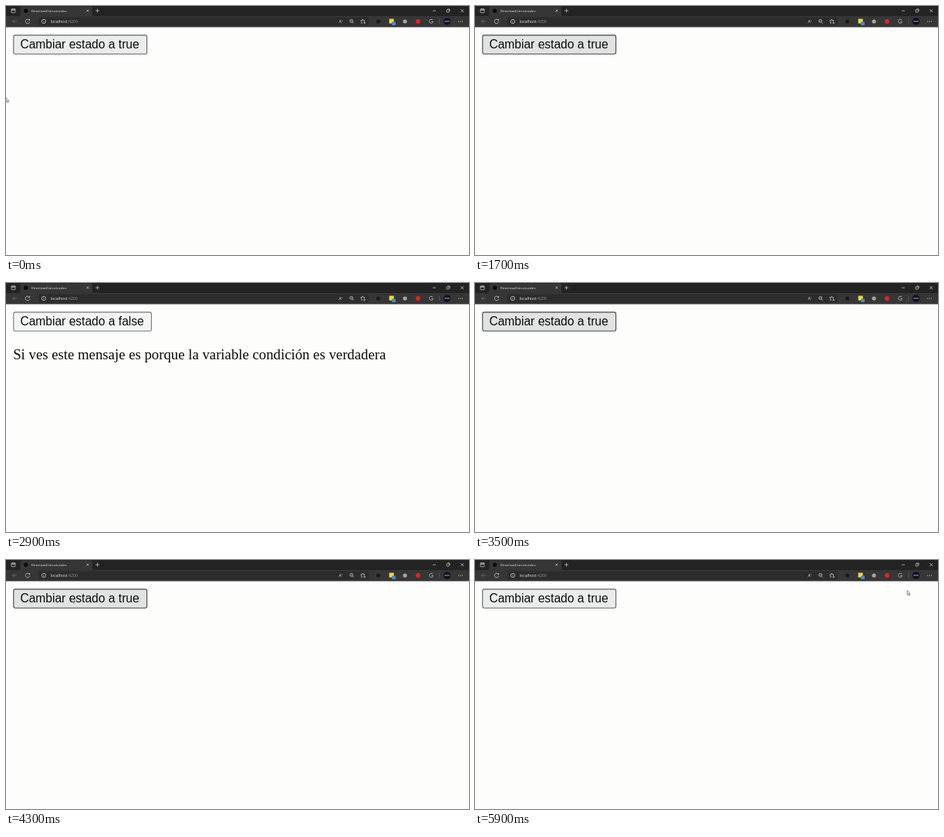
An HTML page for the animation above (6.1 s loop, 600 px wide and 323 px high).

```html
<!DOCTYPE html>
<html lang="es">
<head>
<meta charset="utf-8">
<title>DirectivasEstructurales</title>
<style>
  html, body { margin: 0; width: 100%; height: 100%; overflow: hidden; background: #fdfdfc; }
  svg { display: block; width: 100vw; height: 100vh; }

  .ui { font-family: "Open Sans", sans-serif; fill: #e6e6e6; }
  .line { fill: none; stroke: #d2d2d2; stroke-width: .7; }
  .dim { stroke: #777; }
  .label { font: 15.6px "Liberation Sans", Arial, sans-serif; fill: #0b0b0b; }
  .message { font: 18.75px "Liberation Serif", Times, serif; fill: #0b0b0b; }

  .box, .on, .off, .pointer { animation: 6100ms step-end infinite; }
  .box { animation-name: press; }
  .on { animation-name: show; }
  .off { animation-name: hide; }
  .pointer { animation-name: move; }

  @keyframes press {
    0%, 85.24%, 100% { fill: #ebeded; stroke: #626464; }
    4.91%, 9.83%, 21.31%, 36.06%, 49.18%, 60.65%, 68.85%, 75.4%, 80.32% { fill: #e0e3e2; stroke: #454747; }
    8.19%, 19.67%, 34.42%, 47.54%, 59.01%, 67.21%, 73.77%, 78.68% { fill: #f4f6f6; stroke: #777979; }
  }
  @keyframes show {
    0%, 21.31%, 49.18%, 68.85%, 80.32%, 100% { visibility: hidden; }
    9.83%, 36.06%, 60.65%, 75.4% { visibility: visible; }
  }
  @keyframes hide {
    0%, 21.31%, 49.18%, 68.85%, 80.32%, 100% { visibility: visible; }
    9.83%, 36.06%, 60.65%, 75.4% { visibility: hidden; }
  }
  @keyframes move {
    0%, 100% { transform: translate(-.5px, 118.4px); }
    1.63% { transform: translate(30px, 92px); }
    3.27% { transform: translate(70px, 59px); }
    4.91% { transform: translate(85px, 49px); }
    83.6% { transform: translate(307.6px, 39.6px); }
    85.24% { transform: translate(412px, 41px); }
    86.88% { transform: translate(482px, 42px); }
    88.52% { transform: translate(526px, 42px); }
    90.16% { transform: translate(549px, 41px); }
    91.8% { transform: translate(558px, 40px); }
    93.44% { transform: translate(559.7px, 39.2px); }
  }
</style>
</head>
<body>
<svg viewBox="0 0 600 323" preserveAspectRatio="none">
  <rect width="600" height="323" fill="#fdfdfc"/>

  <!-- Tab strip and toolbar -->
  <rect width="600" height="14" fill="#232323"/>
  <path d="M0 27.4V13H16.5Q18.5 13 18.5 11V2.5Q18.5.5 20.5.5H110Q112 .5 112 2.5V11Q112 13 114 13H600V27.4Z" fill="#363636"/>
  <rect x="42" y="14.6" width="428" height="11" rx="2" fill="#2c2c2c"/>

  <g class="line">
    <rect x="7" y="3.7" width="5" height="5" rx=".8"/>
    <path d="M7 5H12" stroke-width="1.2"/>
    <path d="M104.3 4.6l3 3m0-3l-3 3"/>
    <path d="M116 6.1h5m-2.5-2.5v5"/>
    <path d="M553 6.2h4M589.2 4.2l4 4m0-4l-4 4"/>
    <rect x="571" y="4.8" width="3.2" height="3.2" rx=".5"/>
    <path d="M572.2 4H575V6.9"/>
    <path class="dim" d="M14 20H8.4m2.5-2.5L8.4 20l2.5 2.5"/>
    <path d="M30.3 18.3A2.8 2.8 0 1 0 30.8 20.5M30.7 16.9V18.7H28.9"/>
    <circle cx="49" cy="20" r="2.7"/>
    <path d="M49 19.7v1.7M49 18.2v.7"/>
    <circle cx="447.6" cy="19.4" r="2"/>
    <path d="M449.1 20.9l1.6 1.6M446.7 19.4h1.8"/>
    <path d="M462.3 17l.8 1.8 2 .2-1.5 1.4M462.3 17l-.8 1.8-2 .2 1.5 1.4-.4 2 1.3-.7M463.4 22h2.6m-1.3-1.3v2.6"/>
    <path d="M553 18.2A2.5 2.5 0 1 0 553.6 20.3H551.5"/>
    <path class="dim" d="M561.7 16.5v7" stroke-width=".5"/>
  </g>

  <g class="ui">
    <circle cx="25.7" cy="6.2" r="2.7" fill="#0c0c0c"/>
    <text x="32.8" y="7.8" font-size="4.3">DirectivasEstructurales</text>
    <text x="57.8" y="21.8" font-size="5.2">localhost<tspan fill="#909090">:4200</tspan></text>
    <text x="431.4" y="21.8" font-size="5">A<tspan dy="-1.6" font-size="3.2">»</tspan></text>
    <circle cx="482.5" cy="20" r="2.5" fill="#191919"/>
    <rect x="496.6" y="16.6" width="6" height="6" fill="#e9d84b"/>
    <rect x="500" y="20.6" width="5" height="4.4" rx=".8" fill="#4d83cf"/>
    <circle cx="517" cy="20" r="2.6" fill="#a5a5a5"/>
    <circle cx="534" cy="20" r="3" fill="#d9262e"/>
    <circle cx="571.5" cy="20" r="4.6" fill="#100e18"/>
    <rect x="568" y="18.8" width="7" height="2.2" rx="1" fill="#6a4a91"/>
    <circle cx="586.6" cy="20" r=".6"/>
    <circle cx="589" cy="20" r=".6"/>
    <circle cx="591.4" cy="20" r=".6"/>
  </g>

  <!-- Page -->
  <g class="off">
    <rect class="box" x="9.8" y="37.9" width="172.8" height="24.4" rx="2.2" stroke-width="1.1"/>
    <text class="label" x="18.4" y="55.3">Cambiar estado a true</text>
  </g>
  <g class="on">
    <rect class="box" x="9.8" y="37.9" width="178.6" height="24.4" rx="2.2" stroke-width="1.1"/>
    <text class="label" x="18.4" y="55.3">Cambiar estado a false</text>
    <text class="message" x="9.2" y="98.6">Si ves este mensaje es porque la variable condición es verdadera</text>
  </g>

  <path class="pointer" d="M.4.4V6l1.3-1.1.9 2 .9-.4-.9-1.9H4.3Z" fill="#fff" stroke="#333" stroke-width=".6"/>
</svg>
</body>
</html>
```
